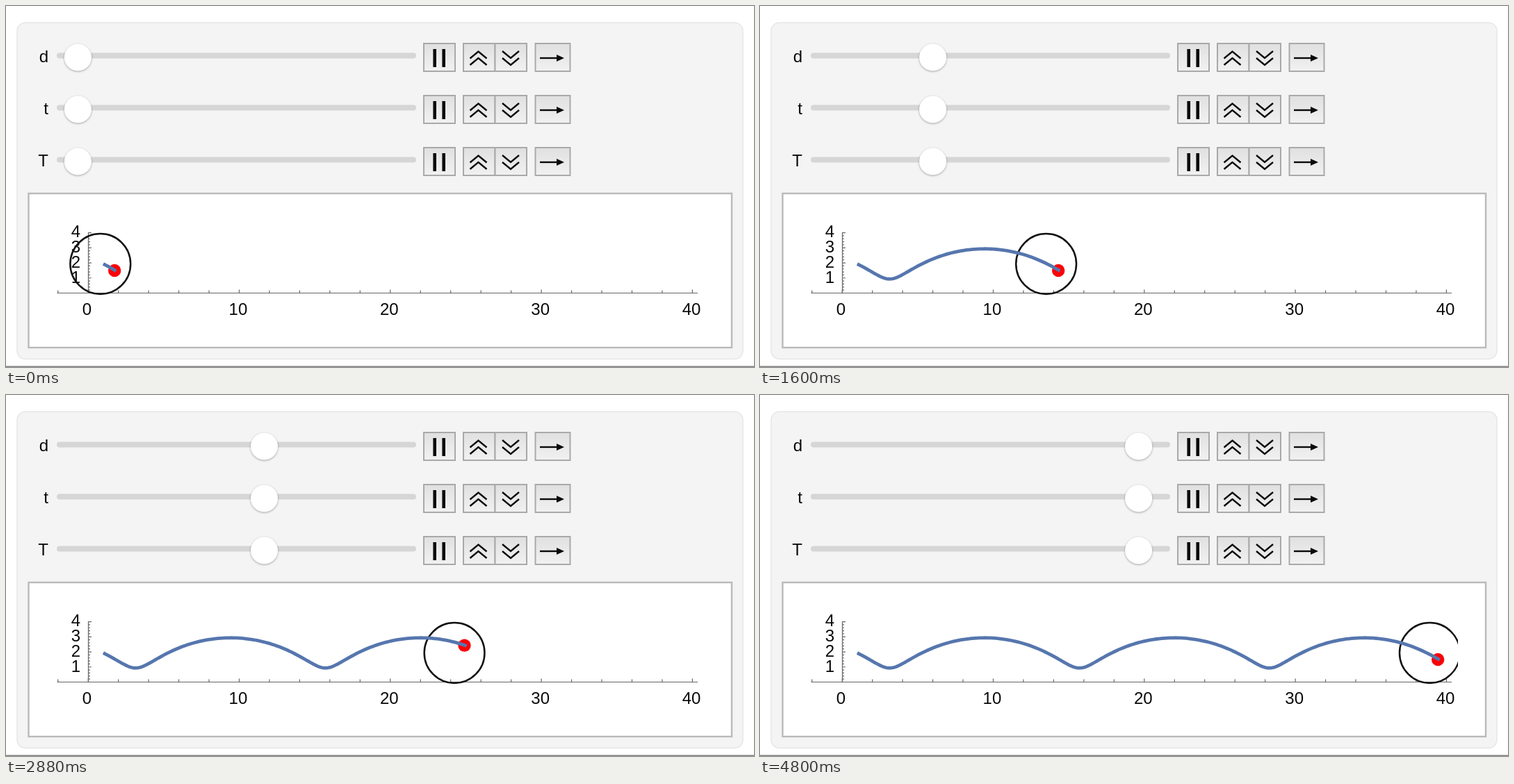
An HTML page for the animation above (4880 ms loop, 1076 by 520 pixels).

```html
<!DOCTYPE html>
<html lang="en">
<head>
<meta charset="utf-8">
<title>Rolling circle</title>
<style>
  html, body { margin: 0; width: 1076px; height: 520px; overflow: hidden; background: #fff; }
  svg { display: block; }
  text { font: 24px "Liberation Sans", Arial, sans-serif; fill: #0a0a0a; }
  .end { text-anchor: end; }
  .mid { text-anchor: middle; }
  .track { stroke: #d6d6d6; stroke-width: 8; stroke-linecap: round; }
  .thumb { fill: #fff; filter: drop-shadow(0 1px 1.6px rgba(0, 0, 0, .33)); }
  .button { fill: url(#face); stroke: #a9a9a9; stroke-width: 2; }
  .icon { fill: none; stroke: #0a0a0a; stroke-width: 2.4; }
  .axis { fill: none; stroke: #666; stroke-width: 1.2; }
</style>
</head>
<body>
<svg width="1076" height="520" viewBox="0 0 1076 520">
  <defs>
    <linearGradient id="face" x2="0" y2="1">
      <stop offset="0" stop-color="#e0e0e0"/>
      <stop offset=".5" stop-color="#e9e9e9"/>
      <stop offset="1" stop-color="#f1f1f1"/>
    </linearGradient>
    <clipPath id="view"><rect x="62" y="280" width="942" height="200"/></clipPath>
    <g id="controls">
      <path class="track" d="M77 71.5H586"/>
      <rect class="button" x="601" y="54" width="45" height="40"/>
      <rect class="button" x="658" y="54" width="45.5" height="40"/>
      <rect class="button" x="703.5" y="54" width="45.5" height="40"/>
      <rect class="button" x="761.5" y="54" width="50" height="40"/>
      <path class="icon" style="stroke-width:4.6" d="M616.7 62V88M629.7 62V88"/>
      <path class="icon" d="M667.5 75.5L679.5 65.5L691.5 75.5M667.5 85L679.5 75L691.5 85"/>
      <path class="icon" d="M714 65L726 75L738 65M714 75L726 85L738 75"/>
      <path class="icon" d="M768 75H796"/>
      <path d="M792 70L803 75L792 80Z" fill="#0a0a0a"/>
    </g>
  </defs>

  <rect x="16" y="24" width="1044" height="484.5" rx="12" fill="#f4f4f4" stroke="#e6e6e6" stroke-width="1.5"/>
  <rect x="32.5" y="270" width="1011.5" height="222" fill="#fff" stroke="#bababa" stroke-width="2.4"/>
  <path d="M0 519.2H1076" stroke="#858585" stroke-width="1.4"/>

  <g id="sliders"></g>
  <path id="axes" class="axis"/>
  <g id="labels"></g>
  <g clip-path="url(#view)">
    <circle id="wheel" cy="371.5" r="43.4" fill="none" stroke="#111" stroke-width="2.5"/>
    <circle id="dot" r="9.2" fill="#fb0007"/>
    <path id="trail" fill="none" stroke="#5676ae" stroke-width="4.8" stroke-linejoin="round"/>
  </g>
</svg>
<script>
const FRAME = 80, FRAMES = 61;
const UNIT = 21.73, X0 = 118.2, Y0 = 413.5, MID = 371.5;
const HOPS = 13;                      // hops per turn of the wheel
const TURN = 2 * Math.PI / HOPS;      // angle of one hop
const $ = id => document.getElementById(id);

const text = (x, y, cls, s) => `<text x="${x}" y="${y}" class="${cls}">${s}</text>`;

$('sliders').innerHTML = ['d', 't', 'T'].map((name, i) =>
  `<g transform="translate(0 ${75 * i})"><use href="#controls"/>` +
  text(61, 80.5, 'end', name) +
  `<circle class="thumb" cy="74" r="19.6"/></g>`).join('');
const thumbs = document.querySelectorAll('.thumb');

let axes = `M73.5 ${Y0}H995M118.5 ${Y0}V326`;
for (let v = -2; v <= 40; v += 2) {
  axes += `M${X0 + v * UNIT} ${Y0}v${v % 10 ? -4 : -5}`;
}
for (let i = 1; i <= 20; i++) {
  axes += `M118.5 ${Y0 - i * UNIT / 5}h${i % 5 ? 2.5 : 4.5}`;
}
$('axes').setAttribute('d', axes);

$('labels').innerHTML =
  [0, 10, 20, 30, 40].map(v => text(116.5 + v * 21.74, 445.3, 'mid', v)).join('') +
  [1, 2, 3, 4].map(v => text(107, 421 - v * 22, 'end', v)).join('');

function trailPath(end) {
  const steps = Math.ceil(end / 0.12);
  let d = '';
  for (let i = 0; i <= steps; i++) {
    const t = end * i / steps;
    const x = X0 + UNIT * (t + Math.cos(t / 2));
    const y = MID + UNIT * Math.sin(t / 2);
    d += (i ? 'L' : 'M') + x.toFixed(2) + ' ' + y.toFixed(2);
  }
  return d;
}

function draw(frame) {
  // The plot updates in whole hops; the thumbs run half a hop ahead.
  const phase = 0.665 * frame + 0.085;
  const hop = Math.floor(phase);
  const lead = phase - hop >= 0.5 ? 0.5 : 0;
  const angle = 0.45 + hop * TURN;

  thumbs.forEach(t => t.setAttribute('cx', 103.4 + 11.17 * (hop + lead)));
  $('wheel').setAttribute('cx', 135.8 + 21.22 * hop);
  $('dot').setAttribute('cx', 136 + 21 * hop + 22.4 * Math.cos(angle));
  $('dot').setAttribute('cy', MID + 22 * Math.sin(angle));
  $('trail').setAttribute('d', trailPath(2 * TURN * (hop + 1)));
}

const start = performance.now();
let shown = -1;
function tick() {
  const frame = Math.floor((performance.now() - start) / FRAME) % FRAMES;
  if (frame !== shown) draw(shown = frame);
  requestAnimationFrame(tick);
}
tick();
</script>
</body>
</html>
```
